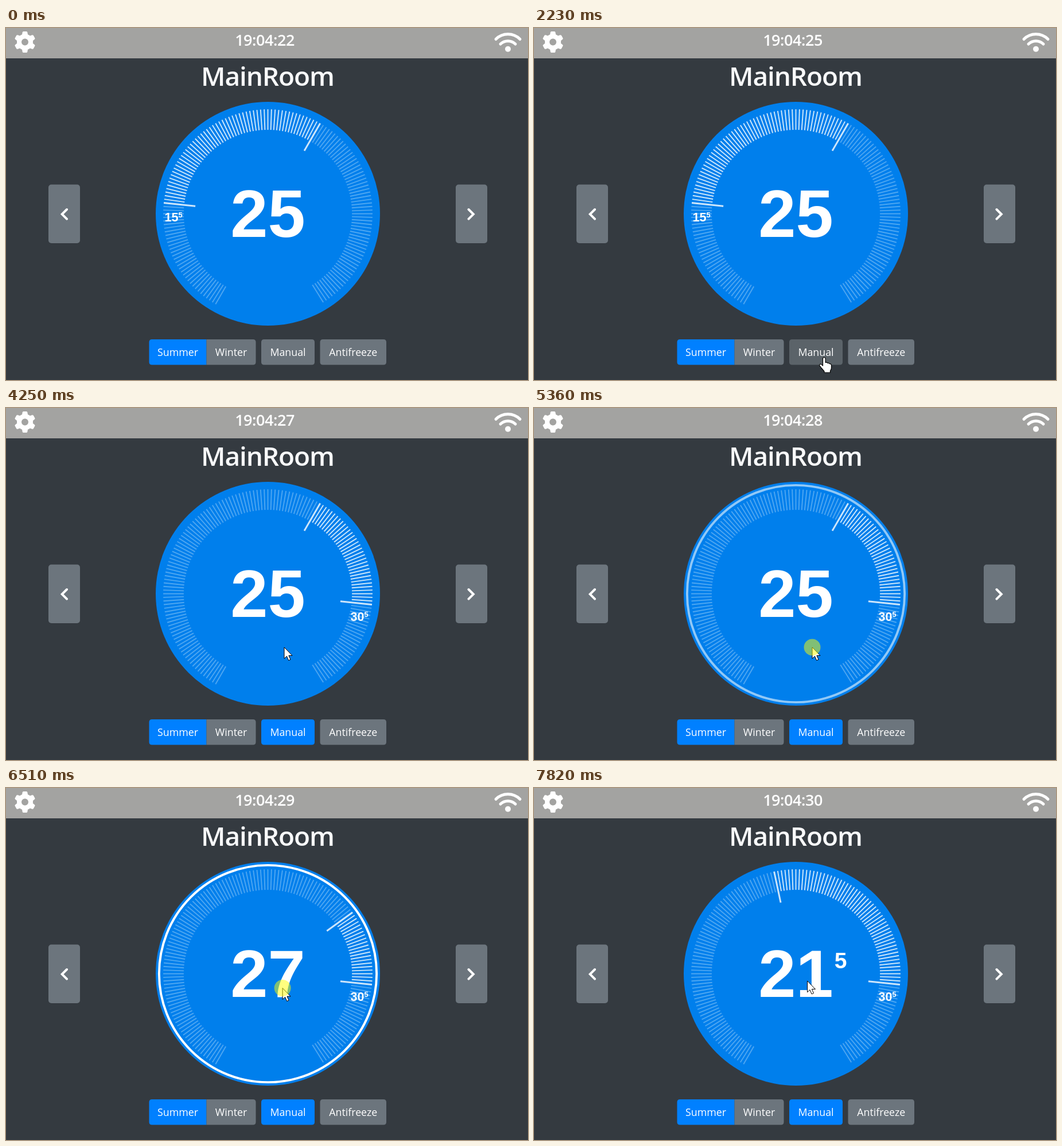
An HTML page that plays this animation: 910 px wide and 615 px high, repeating every 8 s.

```html
<!DOCTYPE html>
<html lang="en">
<head>
<meta charset="utf-8">
<title>Thermostat</title>
<style>
html, body { margin: 0; width: 100%; height: 100%; overflow: hidden; background: #343a40; }
svg { display: block; width: 910px; height: 615px; }
text { fill: #fff; text-anchor: middle; }
.ui { font-family: "Open Sans", "Noto Sans", sans-serif; }
.dial { font-family: "Liberation Sans", Arial, sans-serif; font-weight: bold; }
.icon { fill: none; stroke: #fff; stroke-linecap: round; }
</style>
</head>
<body>
<svg id="stage" viewBox="0 0 910 615">
  <rect width="910" height="615" fill="#343a40"/>
  <rect width="910" height="53" fill="#a3a3a1"/>
  <g id="gear" transform="translate(33 24.5)">
    <circle r="10" fill="none" stroke="#fff" stroke-width="8"/>
  </g>
  <g class="icon" stroke-width="5">
    <path d="M854 19.5A29.5 29.5 0 0 1 896 19.5M862 28A18.5 18.5 0 0 1 888 28"/>
    <circle cx="875" cy="36.7" r="5" fill="#fff" stroke="none"/>
  </g>
  <g class="ui">
    <text id="clock" x="451" y="31" font-size="27" font-weight="600" letter-spacing="-.45"></text>
    <text x="456" y="101" font-size="46" font-weight="600" letter-spacing="-1.1" style="fill:#f8f9fa">MainRoom</text>
  </g>
  <g fill="#6c757d">
    <rect x="74" y="273.5" width="55" height="102.5" rx="5"/>
    <rect x="784" y="273.5" width="55" height="102.5" rx="5"/>
  </g>
  <path class="icon" stroke-width="4" stroke-linecap="butt" d="M106 317l-8.3 8.3 8.3 8.3M806.500 317l8.300 8.300-8.300 8.300"/>
  <g id="buttons" class="ui" font-size="17.800"></g>
  <g class="dial" transform="translate(456.500 324.500) scale(.9775)">
    <circle r="200" fill="#007fec"/>
    <circle id="ring" r="194" fill="none" stroke="#fff" stroke-width="4"/>
    <g id="ticks" stroke="#fff"></g>
    <text id="value" y="41.600" font-size="120"></text>
    <text id="half" x="80" y="-10.100" font-size="40">5</text>
    <text id="room" font-size="22"><tspan id="roomInt"></tspan><tspan dy="-7" font-size="13.200">5</tspan></text>
  </g>
  <g id="pointer" fill="#fff" stroke="#000" stroke-linejoin="round">
    <path id="arrow" d="M0 0V19.800L4.500 15.700 7.600 23 11 21.500 7.900 14.500H14Z"/>
    <path id="hand" stroke-width="1.200" d="M-2 2.500Q-2 0 .3 0T2.600 2.500V9Q5 8 6.300 10 8.800 9.200 9.800 11.200 13 10.800 13 14.500V18Q13 21 11 23.500V26.500H.5V24.500Q-2 21.500-4.500 18.500L-7.500 14.500Q-8.300 12.500-6.300 11.800-4.500 11.500-2 14.500Z"/>
    <circle id="press" r="14.500" fill="#ff0" fill-opacity=".5" stroke="none"/>
  </g>
</svg>
<script>
const LOOP = 8000;
const TICKS = 150, SWEEP = 300, MIN = 10, RANGE = 25;
const GRAY = [108, 117, 125], GRAY_HOVER = [90, 98, 104];
const BLUE = [0, 128, 255], BLUE_HOVER = [0, 108, 217];
const PX_PER_DEGREE = 31.3;

const $ = id => document.getElementById(id);
const clamp01 = v => Math.max(0, Math.min(1, v));
const mix = (a, b, k) => a + (b - a) * k;
const blend = (a, b, k) => a.map((v, i) => mix(v, b[i], k));
const rgb = c => `rgb(${c.map(Math.round)})`;
const show = (el, on) => el.setAttribute('visibility', on ? 'visible' : 'hidden');

function add(parent, tag, attrs, text) {
  const el = document.createElementNS('http://www.w3.org/2000/svg', tag);
  for (const name in attrs) el.setAttribute(name, attrs[name]);
  if (text) el.textContent = text;
  return parent.appendChild(el);
}

const linear = k => k;
const easeIn = k => k * k;
const easeOut = k => 1 - (1 - k) ** 2;
const smooth = k => k * k * (3 - 2 * k);

// Pointer keys: time, x, y, easing towards the key
const PATH = [
  [450, 778, 622],
  [1300, 663, 490, easeOut],
  [1330, 663, 490, linear],
  [1760, 550, 479, smooth],
  [1860, 550, 479, linear],
  [2230, 505.5, 575.5, smooth],
  [3740, 505.5, 575.5, linear],
  [3790, 504.5, 574.5, linear],
  [4250, 485, 418, smooth],
  [5680, 485, 418, linear],
  [5860, 485, 378, easeIn],
  [6050, 484, 335, linear],
  [6200, 484, 326, easeOut],
  [6370, 484, 326, linear],
  [6620, 478, 400, easeIn],
  [6900, 471, 500, linear],
  [7200, 470, 523, easeOut],
  [7380, 470, 523, linear],
  [7820, 476.5, 337, smooth]
];

function pointerAt(t) {
  const i = PATH.findIndex(key => key[0] > t);
  if (i === 0) return PATH[0].slice(1, 3);
  if (i < 0) return PATH[PATH.length - 1].slice(1, 3);
  const [t0, x0, y0] = PATH[i - 1], [t1, x1, y1, ease] = PATH[i];
  const k = ease((t - t0) / (t1 - t0));
  return [mix(x0, x1, k), mix(y0, y1, k)];
}

// First moment after `from` when the pointer's height crosses y
function crossing(from, y) {
  const side = pointerAt(from)[1] < y;
  let t = from;
  while ((pointerAt(t)[1] < y) === side) t += 5;
  return t;
}
const HOVER_ON = crossing(1860, 544), HOVER_OFF = crossing(3790, 544);
const SECONDS = [220, 1220, 2230, 3240, 4250, 5220, 6210, 7210];

for (let a = 0; a < 360; a += 60) {
  add($('gear'), 'path', { d: 'M-5.500 -10L-4.300 -17Q-4 -18.500 -2.500 -18.500H2.500Q4 -18.500 4.300 -17L5.500 -10Z', fill: '#fff', transform: `rotate(${a})` });
}

function button(label, x, w, color, left = 5, right = 5) {
  const d = `M${x + left} 544H${x + w - right}q${right} 0 ${right} ${right}V${588.5 - right}q0 ${right} ${-right} ${right}` +
    `H${x + left}q${-left} 0 ${-left} ${-left}V${544 + left}q0 ${-left} ${left} ${-left}Z`;
  const shape = add($('buttons'), 'path', { d, fill: rgb(color) });
  add($('buttons'), 'text', { x: x + w / 2, y: 573 }, label);
  return shape;
}
button('Summer', 249.5, 100, BLUE, 5, 0);
button('Winter', 349.5, 86, GRAY, 0, 5);
const manual = button('Manual', 445, 93, GRAY);
button('Antifreeze', 547.5, 115.5, GRAY);

const ticks = Array.from({ length: TICKS }, (_, i) =>
  add($('ticks'), 'line', { y1: -186.67, transform: `rotate(${i * SWEEP / TICKS - SWEEP / 2})` }));

const tickOf = v => Math.round((v - MIN) / RANGE * TICKS);

function drawDial(target, room) {
  const lo = tickOf(Math.min(target, room)), hi = tickOf(Math.max(target, room));
  ticks.forEach((tick, i) => {
    const large = i === lo || i === hi;
    tick.setAttribute('y2', large ? -130 : -150);
    tick.setAttribute('stroke-width', large ? 3 : 2);
    tick.setAttribute('stroke-opacity', i >= lo && i <= hi ? .8 : .3);
  });
  $('value').textContent = Math.floor(target);
  show($('half'), target % 1);

  const deg = (room - MIN) / RANGE * SWEEP - SWEEP / 2 + (room > target ? 8 : -8);
  const a = deg * Math.PI / 180;
  $('room').setAttribute('x', Math.sin(a) * 168.33);
  $('room').setAttribute('y', -Math.cos(a) * 168.33 + 7.6);
  $('roomInt').textContent = Math.floor(room);
}

function draw(t) {
  $('clock').textContent = '19:04:' + (22 + SECONDS.filter(s => t >= s).length);

  const dragY = pointerAt(Math.min(t, 7300))[1];
  const target = t < 5680 ? 25 : Math.round((25 + (418 - dragY) / PX_PER_DEGREE) * 2) / 2;
  drawDial(target, t < 2940 ? 15.5 : 30.5);

  const fadeIn = easeOut(clamp01((t - 5190) / 500));
  const fadeOut = smooth(clamp01((t - 7370) / 440));
  $('ring').setAttribute('opacity', fadeIn * (1 - fadeOut));

  const hover = clamp01((t - HOVER_ON) / 150) * (1 - clamp01((t - HOVER_OFF) / 150));
  const active = clamp01((t - 3230) / 130);
  manual.setAttribute('fill', rgb(blend(blend(GRAY, GRAY_HOVER, hover), blend(BLUE, BLUE_HOVER, hover), active)));

  const overButton = t >= HOVER_ON && t < HOVER_OFF;
  $('pointer').setAttribute('transform', `translate(${pointerAt(t)})`);
  show($('arrow'), t >= 500 && !overButton);
  show($('hand'), overButton);
  show($('press'), t >= 4880 && t < 7420);
}

const start = performance.now();
function frame() {
  draw((performance.now() - start) % LOOP);
  requestAnimationFrame(frame);
}
draw(0);
requestAnimationFrame(frame);
</script>
</body>
</html>
```
